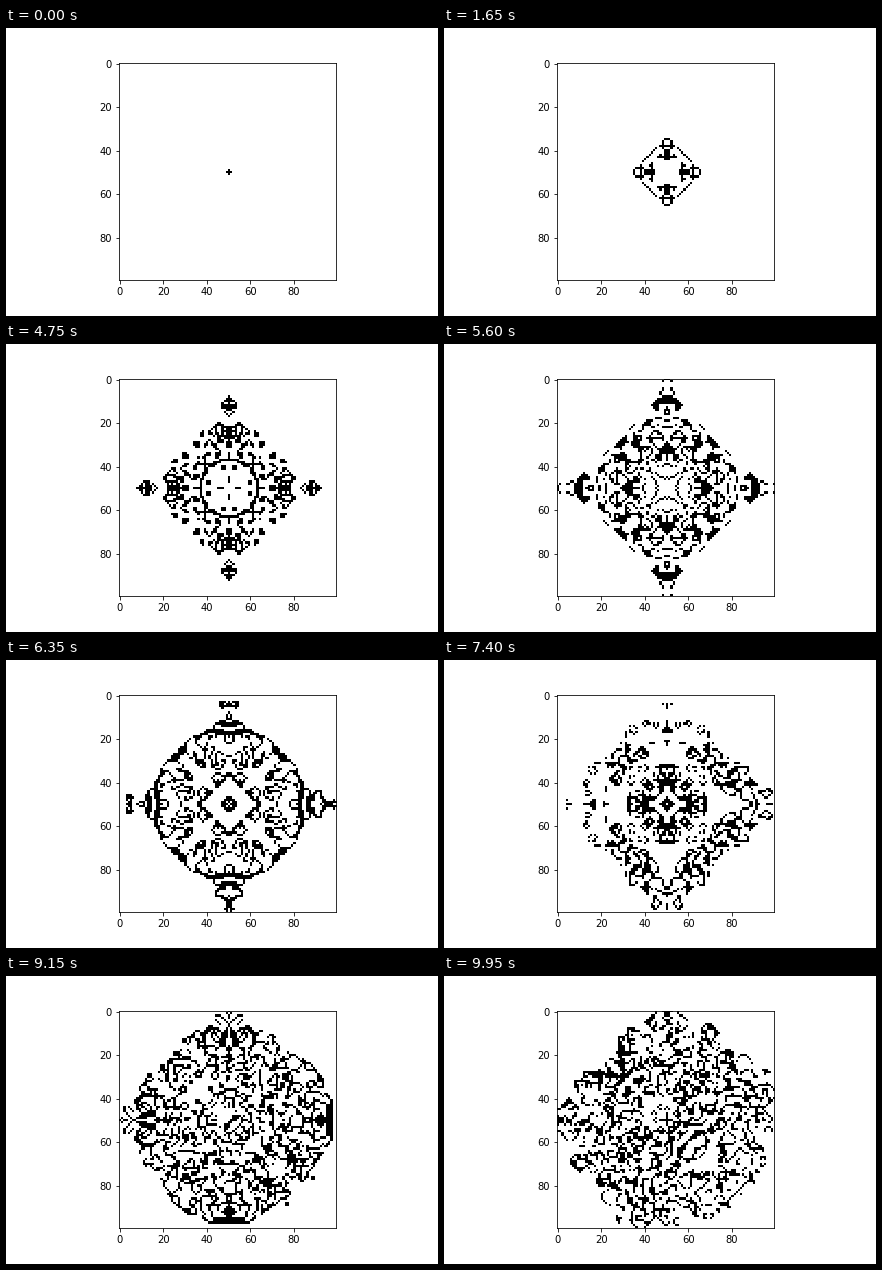
Write a matplotlib script that moves like this. It is 432 px wide and 288 px high and loops after 10 s.

```python
import matplotlib.pyplot as plt
import numpy as np
from matplotlib.animation import FuncAnimation

SIZE = 100
FRAMES = 200
INTERVAL = 50  # ms


def seed():
    """A plus of five live cells in the middle of an empty board."""
    board = np.zeros((SIZE, SIZE), dtype=int)
    mid = SIZE // 2
    board[mid - 1:mid + 2, mid] = 1
    board[mid, mid - 1:mid + 2] = 1
    return board


def step(board):
    """A cell lives when its 3x3 block, itself included, holds 3 or 4 cells."""
    padded = np.pad(board, 1)
    total = sum(padded[dy:dy + SIZE, dx:dx + SIZE]
                for dy in range(3) for dx in range(3))
    return ((total == 3) | (total == 4)).astype(int)


def evolve(count):
    boards = [seed()]
    while len(boards) < count:
        boards.append(step(boards[-1]))
    return boards


boards = evolve(FRAMES)

plt.rcParams["font.family"] = "DejaVu Sans"
plt.rcParams["font.size"] = 10
fig, ax = plt.subplots(figsize=(6, 4), dpi=72, facecolor="white")
fig.subplots_adjust(left=0.125, right=0.9, bottom=0.125, top=0.88)
image = ax.imshow(boards[0], cmap="binary", vmin=0, vmax=1,
                  interpolation="nearest")
ax.set_xticks(range(0, SIZE, 20))
ax.set_yticks(range(0, SIZE, 20))


def update(frame):
    image.set_data(boards[frame])
    return [image]


anim = FuncAnimation(fig, update, frames=FRAMES, interval=INTERVAL,
                     repeat=True, repeat_delay=0)
plt.show()
```
